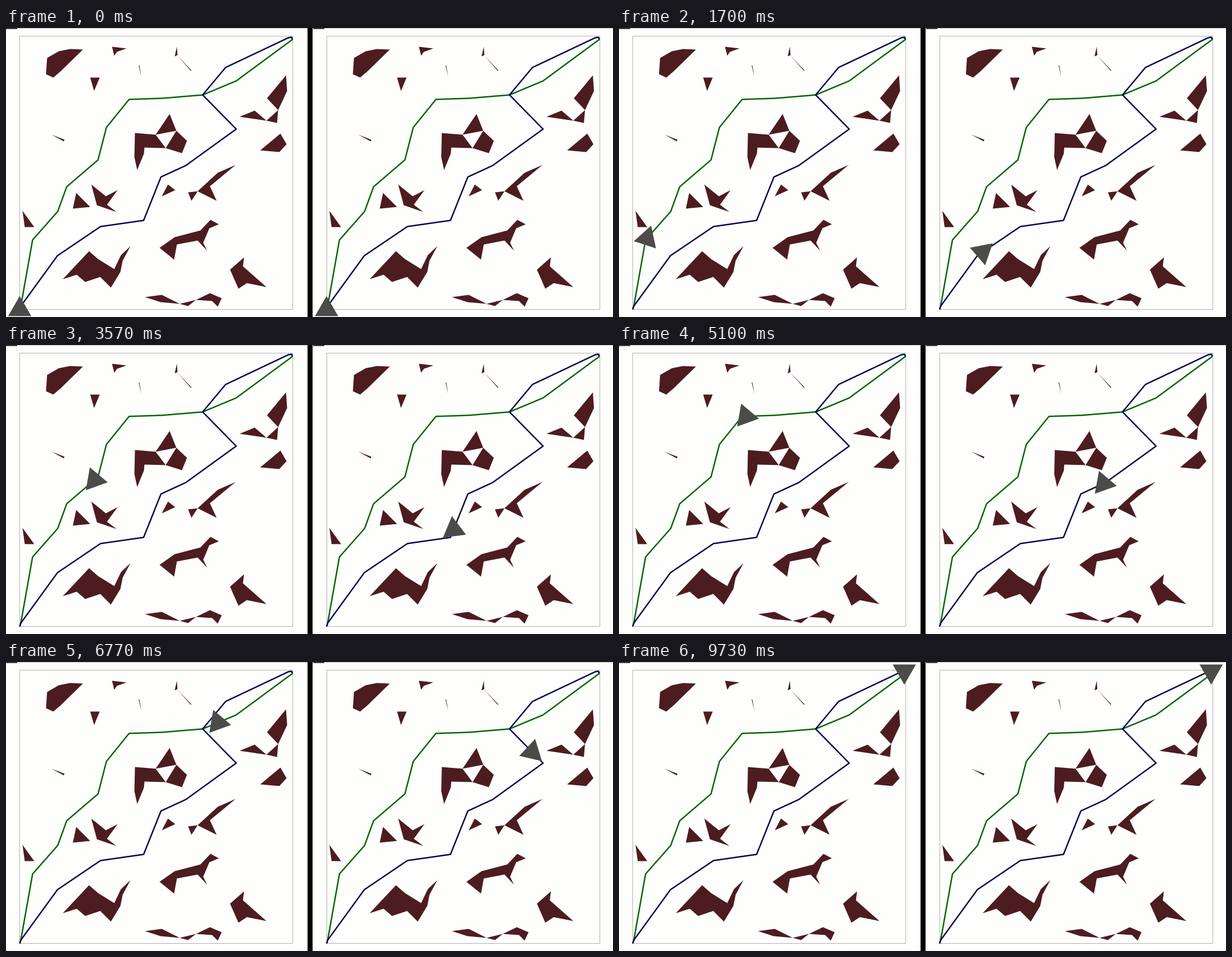
These frames come from a looping animation (1085 by 516 pixels, 9910 ms). A matplotlib script:

```python
import numpy as np
import matplotlib.pyplot as plt
from matplotlib.animation import FuncAnimation
from matplotlib.patches import Polygon, Rectangle

W, H, DPI = 1085, 516, 100
LOOP, FRAMES = 9910, 297
STEP = LOOP / FRAMES
PANE = 548.5   # horizontal offset of the second pane
RADIUS = 24    # circumradius of the robot
HALF = 0.5     # coordinates below name pixels; shift to their centres

PAPER, WALL, ROBOT = "#fefefd", "#4d1c20", "#4b4b49"
GREEN, BLUE, FRAME = "#046404", "#030350", "#b0b0b0"

START, EXIT, GOAL = (24, 502), (26, 496), (509.5, 16)
green_path = [START, EXIT, (47, 378), (92, 327), (108, 283), (164, 235), (179, 177),
              (219.5, 127), (279, 125), (351, 119), (411, 94), (511.5, 20), GOAL]
blue_path = [START, EXIT, (91.5, 406), (168.5, 354), (245.5, 343), (276.5, 265.5),
             (321, 245), (411, 180), (351, 119), (392, 70), (504, 17), GOAL]


def scraps():
    """Small triangles and slivers."""
    yield (189, 33), (215, 36), (198, 42), (193, 49)
    yield (150, 88), (167, 88), (157, 112)
    yield (305, 33), (306, 48), (301, 50)
    yield (306, 49), (331, 75), (330, 76)
    yield (236.5, 66), (238, 67), (241.5, 87)
    yield (81, 190), (104, 199), (103, 202)
    yield (289, 279), (302, 289), (278, 300)
    yield (125, 294), (150, 319), (119, 322)
    yield (29, 326), (50, 355), (33, 355)


def blocks():
    """Larger obstacles; pieces that touch at a corner share one outline."""
    yield (73, 53), (94, 41), (114, 37), (137, 38), (97, 77), (84, 88), (71, 82)
    yield ((500, 84), (502, 112), (486, 146), (484, 169), (465, 165), (417, 158),
           (444, 147), (465, 165), (486, 146), (466, 125))
    yield (490, 188), (501, 207), (488, 221), (454, 218)
    yield ((410, 244), (364, 282), (376, 308), (342, 291), (331, 308), (325, 293),
           (342, 291), (378, 258))
    yield ((230, 187), (267, 190), (292, 153), (304, 183), (267, 190), (285, 214),
           (247, 213), (246, 224), (234, 253), (229, 230))
    yield (304, 183), (323, 201), (314, 223), (285, 214)
    yield (152, 279), (178, 300), (199, 289), (180, 315), (197, 328), (162, 316)
    yield ((148, 398), (164, 412), (193, 430), (205, 405), (222, 389), (208, 415),
           (204, 435), (187, 463), (168, 444), (141, 453), (126, 440), (101, 448))
    yield ((274, 392), (301, 373), (347, 361), (365, 342), (380, 350), (363, 357),
           (352, 383), (359, 397), (342, 379), (305, 386), (300, 413))
    yield (425, 409), (423, 425), (465, 462), (430, 455), (415, 465), (400, 431)
    yield ((248, 480), (278, 476), (310, 492), (339, 485), (364, 473), (385, 482),
           (378, 497), (368, 487), (339, 485), (325, 496), (310, 492), (276, 489))


def place(points, dx):
    return np.array(points, float) + (dx + HALF, HALF)


def px(n):
    return n * 72 / DPI


def ramp(t, keys):
    """Piecewise linear value from (seconds, value) keys."""
    return np.interp(t, *zip(*keys))


class Robot:
    """Triangle that runs along a polyline while it turns clockwise by 180 degrees."""

    def __init__(self, ax, path, dx, pace, turn):
        self.xy = place(path, dx)
        self.arc = np.r_[0, np.cumsum(np.hypot(*np.diff(self.xy, axis=0).T))]
        self.pace, self.turn = pace, turn
        self.patch = ax.add_patch(Polygon(self.shape(0), fc=ROBOT, lw=0, zorder=5))

    def shape(self, t):
        s = ramp(t, self.pace)
        x, y = (np.interp(s, self.arc, c) for c in self.xy.T)
        a = np.radians(ramp(t, self.turn) + np.arange(3) * 120)
        return np.c_[x + RADIUS * np.cos(a), y - RADIUS * np.sin(a)]

    def move(self, t):
        self.patch.set_xy(self.shape(t))
        return self.patch


def box(ax, x, y, w, h, color):
    ax.add_patch(Rectangle((x, y), w, h, fc=color, lw=0))


def draw_pane(ax, dx):
    box(ax, dx, 0, 540, 1, "#c4c4c2")
    box(ax, dx, 0, 20, 2, "#3c3c32")
    ax.add_patch(Rectangle((24.4 + dx, 14.4), 487.6, 488, fill=False,
                           ec=FRAME, lw=px(1)))
    for points in (*scraps(), *blocks()):
        ax.add_patch(Polygon(place(points, dx), fc=WALL, lw=0))
    for path, color in (green_path, GREEN), (blue_path + [(511.5, 18.5)], BLUE):
        ax.plot(*place(path, dx).T, color=color, lw=px(2.5), zorder=3,
                solid_joinstyle="round", solid_capstyle="butt")


fig = plt.figure(figsize=(W / DPI, H / DPI), dpi=DPI, facecolor=PAPER)
ax = fig.add_axes([0, 0, 1, 1])
ax.set(xlim=(0, W), ylim=(H, 0))
ax.axis("off")

for dx in (0, PANE):
    draw_pane(ax, dx)
box(ax, 539, 0, 9, H, "black")

robots = [
    Robot(ax, green_path, 0,
          pace=[(0.3, 0), (8.56, 766)],
          turn=[(0.3, 90), (1.7, 72), (3.57, -10), (6.77, -10), (8.23, 0), (8.7, -90)]),
    Robot(ax, blue_path, PANE,
          pace=[(0.3, 0), (3.57, 301), (5.1, 416), (9.7, 811)],
          turn=[(0.3, 90), (1.7, 41), (3.57, -23), (6.38, 0), (6.77, -43),
                (8.23, -54), (9.7, -90)]),
]


def update(i):
    t = (i + 1) * STEP / 1000
    return [r.move(t) for r in robots]


anim = FuncAnimation(fig, update, frames=FRAMES, interval=STEP, repeat=True,
                     repeat_delay=0, blit=False)
plt.show()
```
